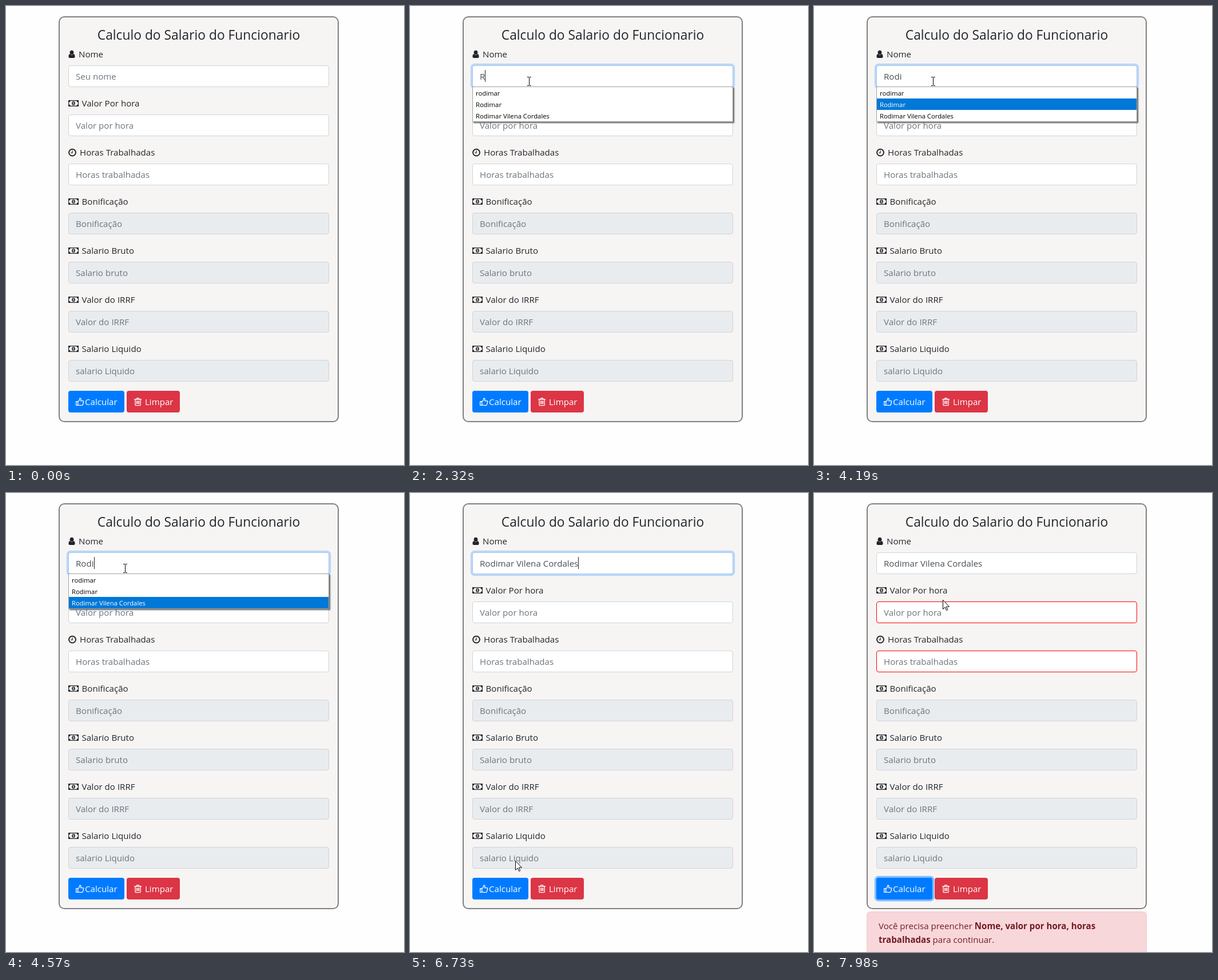
These frames come from a looping animation (696 px wide and 804 px high, 8 s). An HTML page:

```html
<!DOCTYPE html>
<html lang="pt">
<head>
<meta charset="utf-8">
<style>
html, body { margin: 0; width: 100%; height: 100%; overflow: hidden; background: #fefefe }
svg { display: block; font: 15.1px "Open Sans", "Noto Sans", sans-serif; fill: #212529 }
.hint { fill: #6c757d }
.value { fill: #495057; white-space: pre }
.line { fill: none; stroke: #fff; stroke-width: 1.3; stroke-linejoin: round }
#list { font-size: 11.3px; fill: #000 }
#alert { fill: #721c24 }
b, .bold { font-weight: bold }
</style>
</head>
<body>
<svg id="stage" width="696" height="804" viewBox="0 0 696 804"></svg>
<script>
const LOOP = 8000, NAME = 'Rodimar Vilena Cordales';
const FIRST = NAME.split(' ')[0];
const $ = id => document.getElementById(id);

const icons = {
  user: '<path d="M6 0a3.4 3.7 0 0 1 0 7.4A3.4 3.7 0 0 1 6 0zM2.6 6.3Q6 9.6 9.4 6.3Q11.6 7 11.6 11Q11.6 13.3 9.5 13.3H2.5Q.4 13.3.4 11Q.4 7 2.6 6.3z"/>',
  money: '<path fill-rule="evenodd" d="M0 0H18V11H0zM3.5 1.2H14.5A2.3 2.3 0 0 0 16.8 3.5V7.5A2.3 2.3 0 0 0 14.5 9.8H3.5A2.3 2.3 0 0 0 1.2 7.5V3.5A2.3 2.3 0 0 0 3.5 1.2zM9 1.9A2.9 3.6 0 0 1 9 9.1A2.9 3.6 0 0 1 9 1.9zM8.6 3.3H9.6V6.8H10.4V7.6H7.6V6.8H8.5V4.6L7.7 4.9V4z"/>',
  clock: '<circle cx="7" cy="7" r="5.9" fill="none" stroke="#212529" stroke-width="2"/><path d="M7 3.5V7.6H4.4" fill="none" stroke="#212529" stroke-width="1.2"/>',
  thumb: '<path class="line" d="M.7 7h3v6.4h-3zM3.7 7C5.5 6.3 6.6 4 7 1.2C9.2.8 9.6 2.8 8.6 5.6H12.4C14.3 5.8 14 8 13.2 8.2C13.9 9.4 13 10.6 12.6 10.8C12.8 13 11.6 13.5 10 13.6C7 13.7 6 13.4 3.7 12.8"/>',
  trash: '<path class="line" d="M0 3H12.6M3.9 2.8L4.7.8H7.9L8.7 2.8M1.7 3V12.4Q1.7 13.7 2.9 13.7H9.7Q10.9 13.7 10.9 12.4V3M4.3 5.4V11.2M6.3 5.4V11.2M8.3 5.4V11.2"/>'
};
const fields = [
  ['user', 127, 'Nome', 'Seu nome'],
  ['money', 132.5, 'Valor Por hora', 'Valor por hora'],
  ['clock', 129, 'Horas Trabalhadas', 'Horas trabalhadas'],
  ['money', 132.5, 'Bonificação', 'Bonificação'],
  ['money', 132.5, 'Salario Bruto', 'Salario bruto'],
  ['money', 132.5, 'Valor do IRRF', 'Valor do IRRF'],
  ['money', 132.5, 'Salario Liquido', 'salario Liquido']
];

const text = (x, y, s, attrs = '') => `<text x="${x}" y="${y}" ${attrs}>${s}</text>`;
const box = (x, y, w, h, r, attrs) => `<rect x="${x}" y="${y}" width="${w}" height="${h}" rx="${r}" ${attrs}/>`;
const icon = (name, x, y) => `<g transform="translate(${x} ${y})">${icons[name]}</g>`;

const field = ([pic, x, label, hint], i) => {
  const y = 104 + 86 * i;
  return icon(pic, 109, y + (pic == 'money' ? -25 : -26.3)) + text(x, y - 14, label) +
    box(109.5, y + .5, 455, 37, 3.5, `id="box${i}" stroke="#ced4da" fill="${i < 3 ? '#fff' : '#e9ecef'}"`) +
    text(122, y + 25, hint, `id="hint${i}" class="hint"`);
};
const option = (s, i) =>
  box(110, 142 + 20 * i, 454, 20, 0, `id="row${i}"`) + text(115, 157 + 20 * i, s, `id="opt${i}"`);

$('stage').innerHTML =
  box(93, 19, 488, 709, 9, 'fill="#f7f5f4" stroke="gray" stroke-width="2"') +
  text(337, 59, 'Calculo do Salario do Funcionario', 'text-anchor="middle" font-size="22.8"') +
  box(105.8, 100.8, 462.4, 44.4, 7, 'id="glow" fill="#007bff" fill-opacity=".25"') +
  fields.map(field).join('') +
  text(122, 129, '', 'id="value" class="value"') +
  '<path id="caret" stroke="#222" d="M.5 112V133"/>' +
  box(105.8, 670.8, 104.4, 44.4, 7, 'id="ring" fill="#7fbdff"') +
  box(109, 674, 98, 38, 4, 'id="calc"') + icon('thumb', 122, 686) + text(138, 699, 'Calcular', 'fill="#fff"') +
  box(211, 674, 93, 38, 4, 'fill="#dc3545"') + icon('trash', 224.3, 686) + text(243, 699, 'Limpar', 'fill="#fff"') +
  '<g id="list">' +
  box(109.5, 141.5, 455, 61, 0, 'fill="#fff" stroke="#a0a0a0" style="filter:drop-shadow(2px 2px 1px #0009)"') +
  [FIRST.toLowerCase(), FIRST, NAME].map(option).join('') + '</g>' +
  '<g id="alert">' + box(92.5, 733.5, 489, 74, 6, 'fill="#f8d7da" stroke="#f5c6cb"') +
  text(113, 764, 'Você precisa preencher <tspan class="bold">Nome, valor por hora, horas</tspan>') +
  text(113, 788, '<tspan class="bold">trabalhadas</tspan> para continuar.') + '</g>' +
  '<path id="cursor" fill="#fff" stroke="#000"/>';

const shapes = {
  beam: 'M-3-7.5H0M1-7.5H4M.5-7V7M-3 7.5H0M1 7.5H4',
  arrow: 'M.5.5V16.5L4.2 13L6.6 18.5L8.8 17.5L6.4 12.1H11.5Z',
  hand: 'M-2 13V1.5Q-2 0-.5 0T1 1.5V8Q1 6.5 2.3 6.5T3.8 8.3Q3.8 7.1 5 7.1T6.3 8.8Q6.4 7.8 7.4 7.9T8.6 9.3V14Q8.6 17 7 19V22H-2V19.5L-6.5 13.5Q-7.5 11-5.5 10.7Q-4 10.8-2 13Z'
};
// Pointer path: time, x, y
const path = [
  [380, 461, 626], [540, 370, 450], [690, 270, 280], [850, 184, 111], [1000, 204, 125],
  [1700, 204, 125], [1770, 208, 132], [5410, 208, 132], [5570, 240, 188], [5800, 252, 212],
  [6110, 252, 212], [6340, 228, 350], [6650, 185, 640], [6800, 166, 708], [6950, 170, 704],
  [7510, 170, 704], [7670, 190, 560], [7820, 215, 300], [7970, 225, 187], [8100, 225, 187]
];
const typed = [[0, ''], [2240, 1], [2640, 2], [2790, 3], [2870, 4], [4800, NAME.length]];
const blinks = [1480, 2010, 2240, 2470, 2640, 3020, 3570, 4030, 4570, 5120, 5650, 6190, 6720, 7040];

const ramp = (t, from, to) => Math.min(1, Math.max(0, (t - from) / (to - from)));
const within = (t, from, to) => t >= from && t < to;
const show = (id, on) => $(id).style.display = on ? '' : 'none';

function pointer(t) {
  // The pointer is sampled at about 13 pictures per second
  const s = Math.floor((t + 9) / 77.5) * 77.5 - 7;
  const i = Math.max(1, path.findIndex(p => p[0] > s));
  const [a, b] = [path[i - 1], path[i]], k = ramp(s, a[0], b[0]);
  return [1, 2].map(n => Math.round(a[n] + (b[n] - a[n]) * k));
}

function draw(t) {
  const [x, y] = pointer(t);
  const overCalc = t >= 380 && within(x, 109, 207) && within(y, 674, 712);
  const overField = within(x, 109, 565) && within((y - 104) % 86, 0, 38) && y < 314;
  const kind = overCalc ? 'hand' : overField ? 'beam' : 'arrow';
  show('cursor', t >= 380);
  $('cursor').setAttribute('d', shapes[kind]);
  $('cursor').setAttribute('transform', `translate(${x} ${y})`);

  const focus = ramp(t, 1390, 1550) * (t < 7040 ? 1 : 1 - ramp(t, 7040, 7130));
  $('glow').style.opacity = focus;
  $('box0').style.stroke = focus > .5 ? '#a9cbf2' : '#ced4da';

  const length = typed.filter(e => e[0] <= t).pop()[1];
  $('value').textContent = NAME.slice(0, length || 0);
  show('hint0', !length);
  show('caret', blinks.filter(b => b <= t).length % 2);
  const end = length ? $('value').getComputedTextLength() : 0;
  $('caret').setAttribute('transform', `translate(${Math.round(122 + end)} 0)`);

  show('list', within(t, 2320, 4800));
  const chosen = t < 4110 ? -1 : t < 4190 ? 0 : t < 4570 ? 1 : 2;
  for (let i = 0; i < 3; i++) {
    $('row' + i).style.fill = i == chosen ? '#0078d7' : '#fff';
    $('opt' + i).style.fill = i == chosen ? '#fff' : '#000';
  }

  const pressed = within(t, 7040, 7200);
  $('calc').style.fill = pressed ? '#0062cc' : overCalc ? '#0069d9' : '#007bff';
  show('ring', t >= 7040);
  show('alert', t >= 7130);
  const red = ramp(t, 7200, 7280), mix = (c, d) => c + (d - c) * red;
  for (const i of [1, 2]) $('box' + i).style.stroke = `rgb(${mix(206, 255)},${mix(212, 0)},${mix(218, 0)})`;
}

const start = performance.now();
function tick() {
  draw((performance.now() - start) % LOOP);
  requestAnimationFrame(tick);
}
tick();
</script>
</body>
</html>
```
